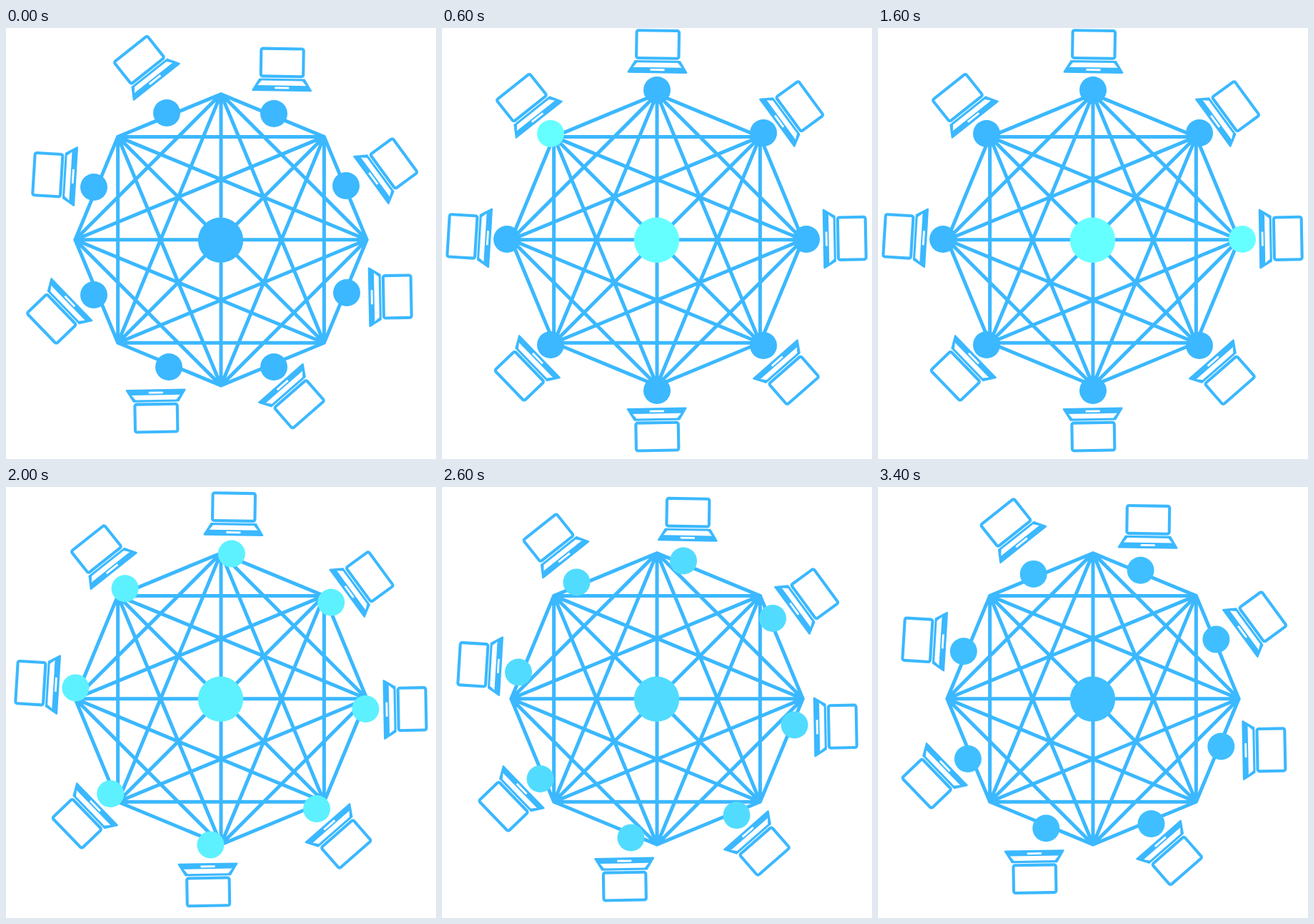
Recreate the animation shown at these times as an HTML page. Size 602 by 604 pixels, loop 3.6 s.

```html
<!DOCTYPE html>
<html lang="en">
<head>
<meta charset="utf-8">
<title>Mesh network</title>
<style>
html, body { margin: 0; width: 100%; height: 100%; overflow: hidden; background: #fff; }
svg { display: block; }
</style>
</head>
<body>
<svg id="stage" width="602" height="604" viewBox="0 0 602 604">
  <defs>
    <g id="laptop">
      <rect x="-29.7" y="-28.7" width="59.4" height="38.8" rx="2.6" fill="#fff" stroke="#3bb8ff" stroke-width="4.1"/>
      <path d="M-32 13.2H32L42 29.6Q42 31 40.5 31H-40.5Q-42 31 -42 29.6Z" fill="#3bb8ff"/>
      <path d="M-28.5 16.3H28.5L34 22.9H-34Z" fill="#fff"/>
      <rect x="-10" y="24.9" width="20" height="2.8" fill="#fff"/>
    </g>
  </defs>
  <rect width="602" height="604" fill="#fff"/>
  <path id="mesh" fill="none" stroke="#3bb8ff" stroke-width="5" stroke-linejoin="miter"/>
  <circle id="hub" cx="300.5" cy="297.3" r="31.7"/>
</svg>
<script>
const STEP = 200, LOOP = 3600, DRIFT = 10;
const BLUE = [59, 184, 255], CYAN = [102, 255, 255];
const stage = document.getElementById('stage');
const hub = document.getElementById('hub');

// Counter-clockwise from upper right.
// node x, y, shift x, y; laptop x, y, shift x, y, angle
const peers = [
  [450, 147, 26, 74, 493.3, 115.2, 42.2, 80.2, 53.8],
  [301, 87, 74, 33, 301.9, 32.3, 84.7, 25.4, 0.9],
  [152, 148, 73, -29, 117.2, 104.9, 75, -52.9, -38.5],
  [91, 296, 32, -73, 37.6, 292.5, 30, -86.3, 273.5],
  [152, 444, -29, -70, 115, 481.3, -44.6, -80, 226],
  [301, 508, -73, -33, 301.2, 563.3, -91, -26, 179],
  [450, 445, -75, 30, 486.5, 486.8, -82, 33.5, 138.8],
  [510, 296, -33, 75, 564.5, 295, -26, 81.7, 88.9]
];

function add(tag, attrs) {
  const el = document.createElementNS('http://www.w3.org/2000/svg', tag);
  for (const k in attrs) el.setAttribute(k, attrs[k]);
  return stage.appendChild(el);
}

function drawMesh() {
  const pts = Array.from({ length: 8 }, (_, i) => {
    const a = i * Math.PI / 4;
    return [301 + 204.2 * Math.cos(a), 296.8 + 204.2 * Math.sin(a)].map(v => v.toFixed(2)).join(' ');
  });
  let d = 'M' + pts.join('L') + 'Z';
  for (let i = 0; i < 8; i++)
    for (let j = i + 2; j < 8; j++)
      if (j - i < 7) d += 'M' + pts[i] + 'L' + pts[j];
  document.getElementById('mesh').setAttribute('d', d);
}

const laptops = peers.map(() => add('use', { href: '#laptop' }));
const nodes = peers.map(() => add('circle', { r: 19 }));

const mix = p => 'rgb(' + CYAN.map((c, i) => Math.round(c + (BLUE[i] - c) * p)) + ')';

function render(t) {
  const step = Math.floor((t % LOOP) / STEP);
  const lit = step >= 1 && step <= 8 ? step - 1 : -1;
  // Drift ends on the first step of the loop.
  const p = lit >= 0 ? 0 : step === 0 ? 1 : (step - 8) / DRIFT;
  hub.setAttribute('fill', mix(p));
  peers.forEach(([x, y, dx, dy, lx, ly, ldx, ldy, angle], i) => {
    nodes[i].setAttribute('cx', x + dx * p);
    nodes[i].setAttribute('cy', y + dy * p);
    nodes[i].setAttribute('fill', mix(lit < 0 || lit === i ? p : 1));
    laptops[i].setAttribute('transform',
      `translate(${lx + ldx * p} ${ly + ldy * p}) rotate(${angle})`);
  });
}

drawMesh();
render(0);
let start;
requestAnimationFrame(function tick(now) {
  if (start === undefined) start = now;
  render(Math.max(0, now - start));
  requestAnimationFrame(tick);
});
</script>
</body>
</html>
```
